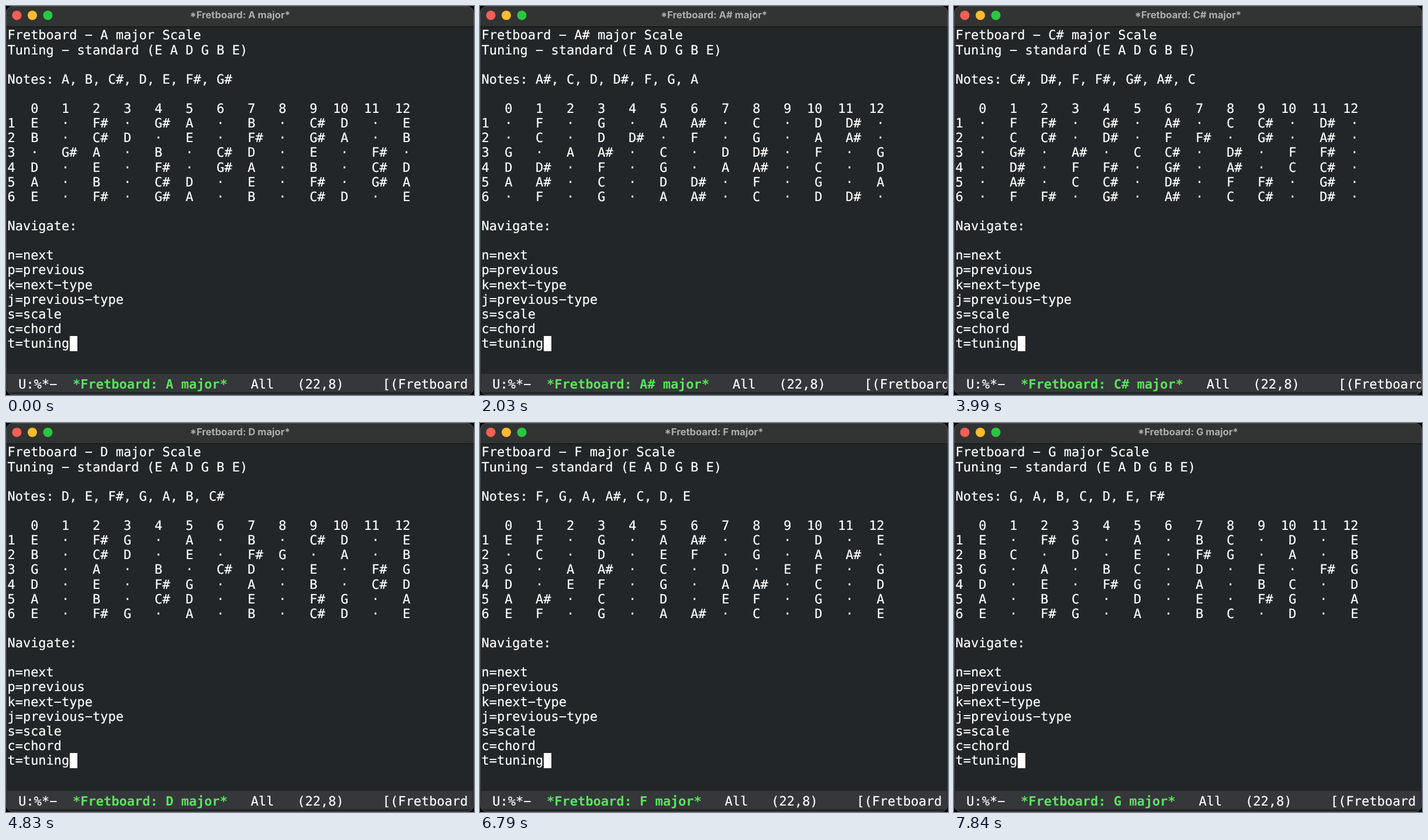
Recreate the animation shown at these times as an HTML page. Size 800 by 666 pixels, loop 8 s.

```html
<!DOCTYPE html>
<html lang="en">
<head>
<meta charset="utf-8">
<title>Fretboard</title>
<style>
  html, body { margin: 0; width: 100%; height: 100%; overflow: hidden; background: #000; }
  svg { display: block; width: 800px; height: 666px; }
  text { white-space: pre; text-rendering: geometricPrecision; }
  .mono { font: 22px "DejaVu Sans Mono", "Liberation Mono", monospace; fill: #fff; stroke: #fff; stroke-width: .2px; }
  .name { font-weight: 700; fill: #5ae55c; stroke: none; }
  .title { font: 700 16.6px Inter, "Liberation Sans", sans-serif; fill: #adaeae; text-anchor: middle; }
</style>
</head>
<body>
<svg id="stage" viewBox="0 0 800 666">
  <defs>
    <clipPath id="win"><rect width="800" height="666" rx="12"/></clipPath>
    <clipPath id="inner"><rect x="2" width="796.5" height="666"/></clipPath>
  </defs>
  <g clip-path="url(#win)">
    <rect width="800" height="666" fill="#232628"/>
    <rect width="800" height="35" fill="#323433"/>
    <rect y="35" width="800" height="1" fill="#0c0d0d"/>
    <rect x="2" y="630" width="796" height="31" fill="#35373a"/>
    <circle cx="18.5" cy="16" r="8" fill="#ff5f57"/>
    <circle cx="45" cy="16" r="8" fill="#febc2e"/>
    <circle cx="71.5" cy="16" r="8" fill="#28c840"/>
    <rect x="109" y="565" width="13" height="26" fill="#fff"/>
  </g>
  <rect x=".5" y=".5" width="799" height="665" rx="12" fill="none" stroke="#55585a" stroke-opacity=".75"/>
  <text id="title" class="title" x="400" y="21.3"></text>
  <g id="lines"></g>
  <g id="mode" clip-path="url(#inner)"></g>
</svg>
<script>
const LOOP = 8000;
const NOTES = ["C", "C#", "D", "D#", "E", "F", "F#", "G", "G#", "A", "A#", "B"];
const MAJOR = [0, 2, 4, 5, 7, 9, 11];
const STRINGS = ["E", "B", "G", "D", "A", "E"];
const HELP = ["Navigate:", "", "n=next", "p=previous", "k=next−type", "j=previous−type",
  "s=scale", "c=chord", "t=tuning"];
// [start in ms, root note]
const STEPS = [[0, "A"], [420, "A#"], [2310, "B"], [2940, "C"], [3990, "C#"], [4620, "D"],
  [5390, "D#"], [5880, "E"], [6440, "F"], [7000, "F#"], [7560, "G"]];

const byId = id => document.getElementById(id);
const frets = Array.from({ length: 13 }, (_, i) => i);

function addText(parent, x, y, cls) {
  const el = document.createElementNS("http://www.w3.org/2000/svg", "text");
  el.setAttribute("x", x);
  el.setAttribute("y", y);
  el.setAttribute("class", cls);
  parent.appendChild(el);
  return el;
}

function screenLines(root) {
  const scale = MAJOR.map(n => NOTES[(NOTES.indexOf(root) + n) % 12]);
  const row = (open, i) => (i + 1) + "  " + frets.map(f => {
    const note = NOTES[(NOTES.indexOf(open) + f) % 12];
    return (scale.includes(note) ? note : "·").padEnd(4);
  }).join("");
  return [
    `Fretboard − ${root} major Scale`,
    "Tuning − standard (E A D G B E)",
    "",
    "Notes: " + scale.join(", "),
    "",
    frets.map(f => String(f).padStart(4)).join(""),
    ...STRINGS.map(row),
    "",
    ...HELP
  ];
}

const CELL = 13.245;
const lines = screenLines("A").map((_, i) => addText(byId("lines"), 2.4, 57.4 + i * 25.13, "mono"));
const modeX = col => 8 + col * CELL;
addText(byId("mode"), modeX(1), 655.3, "mono").textContent = "U:%*−";
const modeName = addText(byId("mode"), modeX(8), 655.3, "mono name");
const modeInfo = addText(byId("mode"), 0, 655.3, "mono");

let shown = "";
function show(root) {
  if (root === shown) return;
  shown = root;
  const name = `*Fretboard: ${root} major*`;
  byId("title").textContent = modeName.textContent = name;
  modeInfo.setAttribute("x", modeX(11 + name.length));
  modeInfo.textContent = "All   (22,8)     [(Fretboard";
  screenLines(root).forEach((s, i) => { lines[i].textContent = s; });
}

function tick() {
  const t = performance.now() % LOOP;
  show(STEPS.filter(s => s[0] <= t).pop()[1]);
  requestAnimationFrame(tick);
}
tick();
</script>
</body>
</html>
```
